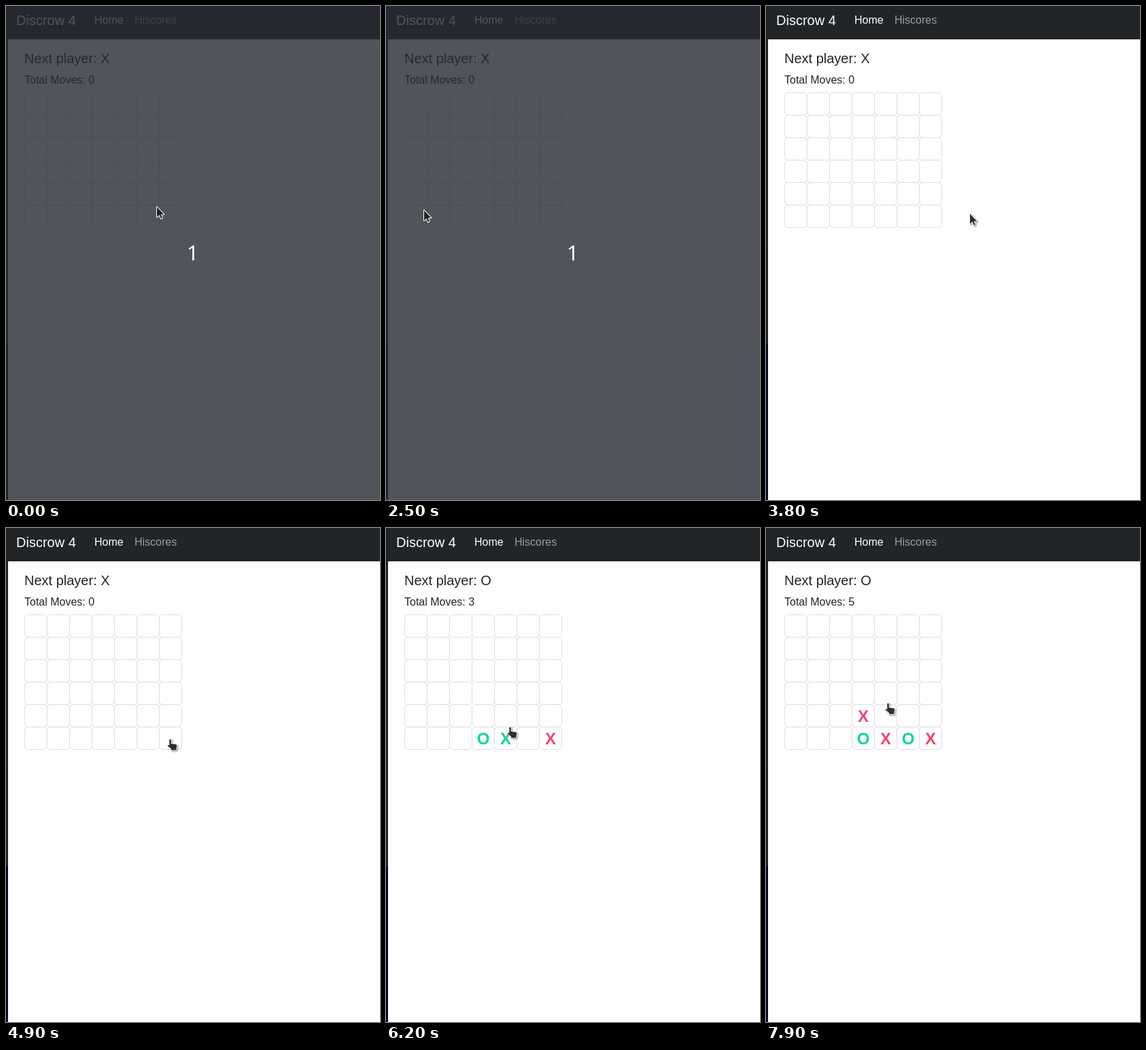
Animation, 550 px wide and 726 px high, one loop 8000 ms. Source, as an HTML page with a canvas:

```html
<!DOCTYPE html>
<html lang="en">
<head>
<meta charset="utf-8">
<title>Discrow 4</title>
<style>
  html, body { margin: 0; width: 100%; height: 100%; overflow: hidden; background: #fefefe; }
  canvas { display: block; }
</style>
</head>
<body>
<canvas id="stage" width="550" height="726"></canvas>
<script>
const ctx = document.getElementById('stage').getContext('2d');
const LOOP = 8000, STEP = 100, REVEAL = 3800;
const TRAVEL = 400; // longest glide between two stops
const SETTLE = 200; // rest on a cell before the click
const SANS = '"Liberation Sans", Arial, sans-serif';
const RED = '#ef476f', GREEN = '#06d6a0', INK = '#212529';
const BOARD = { x: 27, y: 127, cols: 7, rows: 6, pitch: 33, size: 34 };

const stop = (at, x, y) => ({ at, x, y });
const hovers = [
  stop(0, 221, 294), stop(600, 67, 279), stop(1300, 35, 305), stop(1800, 40, 307),
  stop(2700, 69, 290), stop(3700, 278, 264), stop(3800, 299, 304), stop(4300, 175, 277),
  stop(4600, 259, 326), stop(4900, 241, 310), stop(7900, 179, 257)
];
const clicks = [
  stop(5200, 236, 309), stop(5800, 143, 299), stop(6200, 182, 292),
  stop(6800, 203, 296), stop(7500, 143, 264)
];
const trail = [...hovers, ...clicks.map(c => stop(c.at - SETTLE, c.x, c.y))]
  .sort((a, b) => a.at - b.at);

// A click picks the column; the piece lands on whatever is already there.
const columnAt = x => Math.floor((x - BOARD.x) / BOARD.pitch);
const moves = clicks.map((click, i) => {
  const col = columnAt(click.x);
  const below = clicks.slice(0, i).filter(c => columnAt(c.x) === col).length;
  return { at: click.at, col, row: BOARD.rows - 1 - below };
});

const ARROW = new Path2D('M0 0V14.8L3.5 11.5L5.8 17L7.9 16.1L5.7 10.7H10.3Z');
const HAND = new Path2D('M3.2 1.4Q4.5 -.4 5.8 1.4V7L13 8Q14.4 8.5 14.4 10.5L13.4 14V16.4H6V14.5L1 10.4Q.3 8.8 2 8.8L3.4 9.6Z');

function text(str, x, y, size, color, font = SANS, weight = 400) {
  ctx.font = `${weight} ${size}px ${font}`;
  ctx.fillStyle = color;
  ctx.fillText(str, x, y);
}

function rect(x, y, w, h, color) {
  ctx.fillStyle = color;
  ctx.fillRect(x, y, w, h);
}

function pointerAt(t) {
  const i = trail.findIndex(s => s.at > t);
  if (i < 0) return trail[trail.length - 1];
  const from = trail[i - 1], to = trail[i];
  const start = Math.max(from.at, to.at - TRAVEL);
  const k = Math.max(0, (t - start) / (to.at - start));
  const ease = k * k * (3 - 2 * k);
  const mix = (a, b) => Math.round(a + (b - a) * ease);
  return { x: mix(from.x, to.x), y: mix(from.y, to.y) };
}

function drawPage(count) {
  rect(0, 0, 550, 726, '#fefefe');
  rect(0, 0, 3, 497, '#242122');
  rect(0, 348, 3, 1, '#35383b');
  rect(0, 497, 3, 229, '#020a1e');
  rect(3, 0, 547, 49, '#222528');
  text('Discrow 4', 15, 28, 20, '#fff');
  text('Home', 130, 26, 16, '#fff');
  text('Hiscores', 189, 26, 16, 'rgba(255,255,255,.55)');
  text('Next player: ' + 'XO'[count % 2], 27, 84, 20, INK);
  text('Total Moves: ' + count, 27, 114, 16, INK);
}

function drawBoard(t, played) {
  const { x, y, cols, rows, pitch, size } = BOARD;
  ctx.strokeStyle = '#dedede';
  ctx.lineWidth = 1;
  for (let r = 0; r < rows; r++) {
    for (let c = 0; c < cols; c++) {
      ctx.beginPath();
      ctx.roundRect(x + c * pitch + .5, y + r * pitch + .5, size - 1, size - 1, 5);
      ctx.stroke();
    }
  }
  ctx.textAlign = 'center';
  played.forEach((move, i) => {
    const fresh = t - move.at < STEP;
    const color = i % 2 ? GREEN : fresh ? '#1dcb9b' : RED;
    text('XO'[i % 2], x + move.col * pitch + size / 2, y + move.row * pitch + 26, 24, color, SANS, 700);
  });
  ctx.textAlign = 'left';
}

function drawPointer(t) {
  const { x, y } = pointerAt(t);
  const lit = t >= REVEAL;
  const col = columnAt(x);
  const overBoard = col >= 0 && col < BOARD.cols &&
    y >= BOARD.y && y < BOARD.y + BOARD.rows * BOARD.pitch;
  const hand = lit && overBoard;
  const shape = hand ? HAND : ARROW;
  ctx.save();
  ctx.translate(hand ? x - 4 : x + 1, hand ? y : y + 1.5);
  ctx.lineJoin = 'round';
  ctx.lineWidth = 2;
  ctx.strokeStyle = '#fff';
  if (lit) {
    ctx.shadowColor = 'rgba(0,0,0,.5)';
    ctx.shadowBlur = 2;
    ctx.shadowOffsetX = ctx.shadowOffsetY = 1;
  }
  ctx.stroke(shape);
  ctx.shadowColor = 'transparent';
  ctx.fillStyle = lit ? '#2e2e2e' : '#222';
  ctx.fill(shape);
  ctx.restore();
}

function draw(now) {
  const t = Math.floor(now % LOOP / STEP) * STEP;
  const played = moves.filter(move => t >= move.at);
  drawPage(played.length);
  drawBoard(t, played);
  if (t < REVEAL) {
    rect(0, 0, 550, 726, 'rgba(39,42,51,.8)');
    text('1', 266, 374, 30, '#fff', '"Noto Sans", "Open Sans", sans-serif');
  }
  drawPointer(t);
  requestAnimationFrame(draw);
}

requestAnimationFrame(draw);
</script>
</body>
</html>
```
